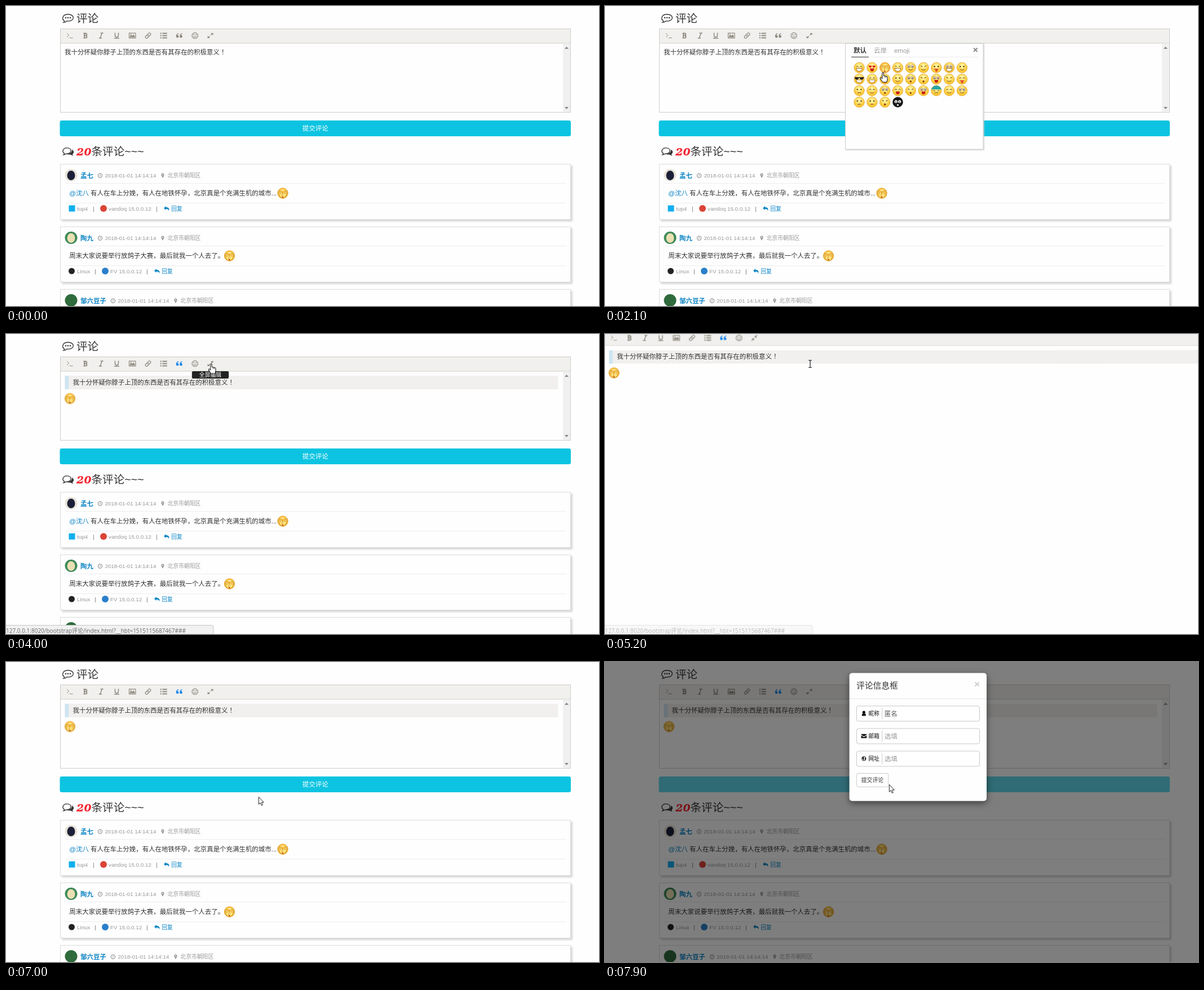
These frames come from a looping animation (1052x532 px, 8 s). An HTML page:

```html
<!DOCTYPE html>
<html lang="zh-CN">
<head>
<meta charset="utf-8">
<title>评论</title>
<style>
html, body { margin: 0; width: 100%; height: 100%; overflow: hidden; background: #fefefe; }
svg { display: block; font-family: "Liberation Sans", "Noto Sans CJK SC", "Noto Sans CJK", sans-serif; }
.icon { fill: none; stroke: currentColor; stroke-width: 1.2; }
.icon .f { fill: currentColor; stroke: none; }
.card { filter: drop-shadow(3px 3px 1.5px #d8d8d8); }
.pop { filter: drop-shadow(1px 1px 1px #ccc); }
.dialog { filter: drop-shadow(0 4px 6px rgba(0, 0, 0, .5)); }
.count { font: italic bold 23px "Noto Serif", serif; font-variant-numeric: oldstyle-nums; }
.mid { font-family: "Noto Sans CJK JP", sans-serif; }

/* 1.25% of the loop is one 100 ms tick */
.a { animation: 8s step-end -5ms infinite; }

#cursor { animation-name: move; }
@keyframes move {
  0%, 2.5% { transform: translate(898px, 102px); animation-timing-function: steps(2); }
  5% { transform: translate(567px, 108px); }
  7.5% { transform: translate(567px, 108px); animation-timing-function: steps(3); }
  11.25% { transform: translate(396px, 88px); }
  12.5% { transform: translate(396px, 88px); animation-timing-function: steps(4); }
  17.5% { transform: translate(335px, 53px); }
  21.25% { transform: translate(335px, 53px); animation-timing-function: steps(4); }
  26.25% { transform: translate(493px, 118px); animation-timing-function: steps(3); }
  30% { transform: translate(494px, 114px); }
  31.25% { transform: translate(494px, 114px); animation-timing-function: steps(4); }
  36.25% { transform: translate(334px, 84px); animation-timing-function: steps(4); }
  41.25% { transform: translate(307px, 54px); }
  43.75% { transform: translate(307px, 54px); animation-timing-function: steps(4); }
  48.75% { transform: translate(362px, 54px); }
  50% { transform: translate(364px, 53px); }
  66.25% { transform: translate(364px, 53px); animation-timing-function: steps(4); }
  71.25% { transform: translate(268px, 18px); }
  72.5% { transform: translate(265px, 12px); }
  80% { transform: translate(265px, 12px); animation-timing-function: steps(3); }
  83.75% { transform: translate(400px, 232px); }
  85% { transform: translate(413px, 250px); animation-timing-function: steps(2); }
  87.5% { transform: translate(448px, 239px); animation-timing-function: steps(2); }
  90%, 100% { transform: translate(504px, 217px); }
}
#beam { animation-name: beam; }
@keyframes beam {
  0%, 16.25%, 38.75%, 71.25%, 100% { visibility: hidden; }
  2.5%, 33.75%, 61.25% { visibility: visible; }
}
#hand { animation-name: hand; }
@keyframes hand {
  0%, 33.75%, 61.25%, 80%, 92.5%, 100% { visibility: hidden; }
  16.25%, 38.75%, 71.25%, 90% { visibility: visible; }
}
#arrow { animation-name: arrow; }
@keyframes arrow {
  0%, 90% { visibility: hidden; }
  80%, 92.5%, 100% { visibility: visible; }
}
#plain { animation-name: before-quote; }
#quote { animation-name: after-quote; }
#quoteIcon { animation-name: quote-icon; }
#inserted { animation-name: inserted; }
@keyframes before-quote { 0% { visibility: visible; } 42.5%, 100% { visibility: hidden; } }
@keyframes after-quote { 0% { visibility: hidden; } 42.5%, 100% { visibility: visible; } }
@keyframes quote-icon { 0% { color: #8e8a80; } 42.5%, 100% { color: #1a87ea; } }
@keyframes inserted {
  0% { visibility: hidden; transform: translateY(-4px); }
  31.25% { visibility: visible; transform: translateY(-4px); }
  42.5%, 100% { visibility: visible; transform: none; }
}
#caretLine { animation-name: caret-line; }
#caretQuote { animation-name: caret-quote; }
@keyframes caret-line { 0%, 17.5%, 100% { visibility: hidden; } 12.5% { visibility: visible; } }
@keyframes caret-quote { 0%, 61.25%, 100% { visibility: hidden; } 56.25% { visibility: visible; } }
#panel { animation-name: panel; }
@keyframes panel { 0%, 31.25%, 100% { visibility: hidden; } 21.25% { visibility: visible; } }
#tipFace { animation-name: tip-face; }
#tipQuote { animation-name: tip-quote; }
#tipFull { animation-name: tip-full; }
@keyframes tip-face { 0%, 21.25%, 100% { visibility: hidden; } 17.5% { visibility: visible; } }
@keyframes tip-quote { 0%, 43.75%, 100% { visibility: hidden; } 41.25% { visibility: visible; } }
@keyframes tip-full { 0%, 61.25%, 80%, 100% { visibility: hidden; } 46.25%, 73.75% { visibility: visible; } }
#status { animation-name: status; }
@keyframes status {
  0%, 67.5%, 80%, 100% { opacity: 0; }
  45%, 75% { opacity: 1; }
  61.25% { opacity: 1; animation-timing-function: steps(3); }
  65%, 72.5% { opacity: .45; }
  73.75% { opacity: .8; }
}
#edit { animation-name: edit; }
#cover, #shrink { animation-name: full-on; }
#grow { animation-name: full-off; }
@keyframes edit { 0%, 80%, 100% { transform: none; } 61.25% { transform: translate(-97.5px, -45.5px); } }
@keyframes full-on { 0%, 80%, 100% { visibility: hidden; } 61.25% { visibility: visible; } }
@keyframes full-off { 0%, 80%, 100% { visibility: visible; } 61.25% { visibility: hidden; } }
#submit { animation-name: submit; }
#ready { animation-name: ready; }
#busy { animation-name: busy; }
@keyframes submit { 0% { opacity: 1; } 92.5%, 100% { opacity: .65; } }
@keyframes ready { 0% { visibility: visible; } 92.5%, 100% { visibility: hidden; } }
@keyframes busy { 0% { visibility: hidden; } 92.5%, 100% { visibility: visible; } }
#shade { animation-name: shade; }
@keyframes shade {
  0% { opacity: 0; } 93.75% { opacity: .1; } 95% { opacity: .21; }
  96.25% { opacity: .4; } 97.5%, 100% { opacity: .5; }
}
#modal { animation-name: drop; }
#sheet { animation-name: sheet; }
#form { animation-name: form; }
@keyframes drop {
  0% { transform: translateY(-57px); }
  95% { transform: translateY(-33px); }
  96.25% { transform: translateY(-14px); }
  97.5% { transform: translateY(-3px); }
  98.75%, 100% { transform: none; }
}
@keyframes sheet { 0% { opacity: 0; } 95% { opacity: .85; } 96.25%, 100% { opacity: 1; } }
@keyframes form { 0% { opacity: 0; } 95% { opacity: .5; } 96.25% { opacity: .85; } 97.5%, 100% { opacity: 1; } }
</style>
</head>
<body>
<script>
const SMALL = 9.82, BODY = 11.46, HEAD = 19.6;
const GREY = '#8e8a80', BLUE = '#0a84c4', MUTED = '#999';

const text = (x, y, s, size = BODY, fill = '#333', more = '') =>
  `<text x="${x}" y="${y}" font-size="${size}" fill="${fill}" ${more}>${s}</text>`;
const rect = (x, y, w, h, fill, more = '') =>
  `<rect x="${x}" y="${y}" width="${w}" height="${h}" fill="${fill}" ${more}/>`;
const line = (x1, y1, x2, y2, color) => `<path d="M${x1} ${y1}L${x2} ${y2}" stroke="${color}"/>`;
const dot = (x, y, r, fill, more = '') => `<circle cx="${x}" cy="${y}" r="${r}" fill="${fill}" ${more}/>`;
const path = (d, more = '') => `<path d="${d}" ${more}/>`;
const solid = d => path(d, 'class="f"');
const anim = (id, body) => `<g id="${id}" class="a">${body}</g>`;
const at = (x, y, body) => `<g transform="translate(${x} ${y})">${body}</g>`;

const mark = 'M-5.9 1.6a2.4 2.4 0 1 0 4.8 0a2.3 2.3 0 0 0-2.6-2.3c.2-1.2 1-1.9 2.2-2.2v-1.3c-2.7.3-4.4 2.4-4.4 5.8z';
const icons = {
  code: path('M-5-4L-1.5-.7L-5 2.6M-.5 4H5.5', 'stroke-width="1"'),
  bold: path('M-3.5-4H.3a1.9 1.9 0 0 1 0 3.9H-2M.5 0a2 2 0 0 1 0 4.1H-3.5M-1.9-4V4', 'stroke-width="1.8"'),
  italic: path('M-1.2-4.4H4M-4 4.4H1.2M1.6-4.4L-1.6 4.4', 'stroke-width="1.5"'),
  under: path('M-3-5V-.3a3 3 0 0 0 6 0V-5M-4.5 4.8H4.5', 'stroke-width="1.5"'),
  image: path('M-5.7-4.4H5.7V4.4H-5.7Z') + solid('M-4.4 3V1L-2-1.2L0 .6L2-2.2L4.4 1V3Z') + dot(-2.8, -2, 1, '', 'class="f"'),
  link: `<g transform="rotate(-45)">${path('M1-2.2H-3.6a2.2 2.2 0 0 0 0 4.4H-1M-1 2.2H3.6a2.2 2.2 0 0 0 0-4.4H1M-2.4 0H2.4')}</g>`,
  list: path('M-6-4h2.2M-6 0h2.2M-6 4h2.2M-2.2-4H6M-2.2 0H6M-2.2 4H6', 'stroke-width="1.9"'),
  quote: solid(mark) + `<g transform="translate(6.4)">${solid(mark)}</g>`,
  smile: dot(0, 0, 5.2, 'none') + path('M-2.7 1.2Q0 4.4 2.7 1.2') + solid('M-2.7-2.4h1.6v1.8h-1.6zM1.1-2.4h1.6v1.8h-1.6z'),
  grow: path('M1 -1L4-4M-1 1L-4 4', 'stroke-width="1.6"') + solid('M5-4.6V-.8L1.2-4.6ZM-5 4.6V.8L-1.2 4.6Z'),
  shrink: path('M2-2L5-5M-2 2L-5 5', 'stroke-width="1.6"') + solid('M.6-.6V-4.4L4.4-.6ZM-.6 .6V4.4L-4.4 .6Z'),
  comment: path('M-6.3 5.1C-12 1.4-9.4-6.8 0-6.8C12.5-6.8 12.5 5.4 0 5.4L-2.2 5.2Q-4.8 7.6-7.8 7.6Q-6.2 6.6-6.3 5.1Z', 'stroke-width="1.4"') +
    [-4, 0, 4].map(x => dot(x, -.7, 1.3, '', 'class="f"')).join(''),
  comments: path('M-6.4 3.4C-11.4 .8-9-6.4-1.8-6.4C7.6-6.4 7.6 4 -1.8 4L-3.3 3.9Q-5.4 5.8-8 5.8Q-6.4 4.6-6.4 3.4Z', 'stroke-width="1.4"') +
    solid('M7-3.6C11-1.4 11 2.8 7.8 4.6Q8 6 9.6 7.2Q6.8 7.2 4.8 5.4Q.4 6-2.4 4.6C4.4 4.6 7.4 1 7-3.6Z'),
  clock: dot(0, 0, 3.6, 'none') + path('M.3-2V.6H-1.6', 'stroke-width=".9"'),
  pin: path('M0 4.4L-2.3 .2A2.7 2.7 0 1 1 2.3 .2ZM-1-1.4a1 1 0 1 0 2 0a1 1 0 1 0-2 0Z', 'class="f" fill-rule="evenodd"'),
  reply: solid('M-5-.8L-1.2-4.4V-2.2C3.4-2.2 5.2-.4 4 4C3.2 1.4 1.8 .6-1.2 .6V2.8Z'),
  user: solid('M-3.6 4.2C-3.8 1.2-2.6 .2-1.4 0A2.5 2.5 0 1 1 1.4 0C2.6 .2 3.8 1.2 3.6 4.2Z'),
  mail: solid('M-4.8-3.6H4.8V-2.6L0 .8L-4.8-2.6ZM-4.8-1.2L0 2.2L4.8-1.2V3.8H-4.8Z'),
  globe: dot(0, 0, 3.7, 'none', 'stroke-width="1"') + solid('M-3-2.4L.6-3L-.4-.6L.6 .6L-.8 2.6L-2.6-.2ZM1.4-1L3.4-1.2L3 1.6L1.8 2.4Z')
};
const icon = (name, x, y, color) =>
  `<g class="icon" color="${color}" transform="translate(${x} ${y})">${icons[name]}</g>`;

/* Faces: first letter eyes, second letter mouth */
const pair = f => f(-3.2) + f(3.2);
const eyes = {
  o: pair(x => dot(x, -2, 1.2, '#5a3208')),
  n: pair(x => path(`M${x - 2}-1.4q2-2.6 4 0`, 'stroke="#5a3208" fill="none"')),
  x: path('M-5-3.2L-1.6-1.8M5-3.2L1.6-1.8', 'stroke="#5a3208"'),
  w: pair(x => dot(x, -2.2, 2.5, '#fff', 'stroke="#7a4a10" stroke-width=".6"') + dot(x, -1.8, 1.1, '#40240a')),
  h: pair(x => path(`M${x} .6l-2.8-3q.4-2.4 2.8-.8q2.4-1.6 2.8 .8z`, 'fill="#e01c1c"')),
  s: path('M-8.4-3.4H8.4Q7.6 1 4.4 .8Q1.4 .6 .8-2H-.8Q-1.4 .6-4.4 .8Q-7.6 1-8.4-3.4Z', 'fill="#1c1c1c"'),
  m: path('M-9-2.2A9.3 9.3 0 0 1 9-2.2Z', 'fill="#2aa6a4"') + path('M-5 0h3M2 0h3', 'stroke="#5a3208"')
};
const mouths = {
  s: path('M-3.8 2.4Q0 6.2 3.8 2.4', 'stroke="#7a3c08" fill="none"'),
  g: path('M-5.4 1.2H5.4Q4.4 6.6 0 6.6T-5.4 1.2Z', 'fill="#fff" stroke="#8a4a10" stroke-width=".8"'),
  r: path('M-3.4 1.4H3.4Q3.4 6.6 0 6.6T-3.4 1.4Z', 'fill="#c91f14"'),
  t: path('M-4.4 2H4.4Q3.4 4 2 4V7H-1.6V4Q-3.6 4-4.4 2Z', 'fill="#e2472e"'),
  o: dot(0, 4, 1.7, '#8a3a0a'),
  f: path('M-3 4.2Q0 2.6 3 4', 'stroke="#7a3c08" fill="none"')
};
const hand = s => `<g transform="scale(${s} 1) rotate(24)" fill="#ffe07a" stroke="#cf8a1c" stroke-width=".8">
  ${path('M1.4 6.8Q-.4 2 .4-3.6Q1.4-6.6 2.8-5.6Q4.2-7.6 5.4-5.4Q7.2-5.4 7-2.6Q8 4 5.4 7Z')}
  ${path('M2.8-5.4V-.6M5-5.2V0', 'fill="none"')}</g>`;
const cover = dot(0, 0, 9.2, '#fdc544', 'stroke="#d8941c" stroke-width=".8"') +
  path('M-6-4.6Q0-8.6 6-4.6', 'fill="#fff0a0"') + hand(-1) + hand(1) + path('M-1.4 6.8h2.8', 'stroke="#b5380e" stroke-width="1.4"');
const face = k => k === 'cc' ? cover
  : k === 'kk' ? dot(0, 0, 9.3, '#161616') + pair(x => dot(x, -1, 2.6, '#fff') + dot(x, -.6, 1, '#161616')) + dot(0, 5, 1.6, '#fff')
  : dot(0, 0, 9.2, 'url(#skin)', 'stroke="#dc9c20" stroke-width=".7"') + eyes[k[0]] + mouths[k[1]];
const faces = ('ng hr cc xg ws xs ot wg os sg ng ot os wo xo wr xs nt ' +
  'of ns wo nr xo wr mf ns ws of of xo kk').split(' ');

const tools = ['code', 'bold', 'italic', 'under', 'image', 'link', 'list', 'quote', 'smile']
  .map((n, i) => n === 'quote'
    ? `<g id="quoteIcon" class="a">${icon(n, 307.6, 52.5, 'inherit')}</g>`
    : icon(n, 113.2 + 27.75 * i, 52.5, GREY)).join('');

const tip = (id, x, s) => {
  const w = s.length * SMALL + 26;
  return anim(id, rect(x - w / 2, 66, w, 13, '#222', 'rx="2"') + path(`M${x - 4} 66l4-4l4 4z`, 'fill="#222"') +
    text(x, 76.2, s, SMALL, '#fff', 'text-anchor="middle"'));
};

const cards = [
  { name: '孟七', skin: ['#e9e3d8', '#1b2038'], to: '@沈八', say: '有人在车上分娩，有人在地铁怀孕，北京真是个充满生机的城市...', face: 491,
    os: 'tup4', sign: rect(111.5, 353.5, 11, 11, '#11aeee'), web: 'vandoq 15.0.0.12', color: '#db4437', foot: [155, 173, 267] },
  { name: '陶九', skin: ['#3d8a58', '#ecdfb4'], to: '', say: '周末大家说要举行放鸽子大赛，最后就我一个人去了。', face: 396.5,
    os: 'Linux', sign: dot(116.5, 359, 5.5, '#222'), web: 'FV 15.0.0.12', color: '#2a7fc9', foot: [158, 176, 250] },
  { name: '邹六豆子', skin: ['#2f6b3c', '#2f6b3c'], to: '', say: '', face: 0 }
];
const card = (c, i) => {
  const dx = (c.name.length - 2) * BODY;
  let s = rect(96.5, 280.5, 905, 98, '#fefefe', 'stroke="#dcdcdc" class="card"') +
    dot(115.5, 300, 11, c.skin[0]) + `<ellipse cx="115.5" cy="300.5" rx="7" ry="8.5" fill="${c.skin[1]}"/>` +
    text(132, 304.7, c.name, BODY, BLUE, 'font-weight="bold"') +
    icon('clock', 167 + dx, 300.8, MUTED) + text(175.4 + dx, 304.4, '2018-01-01 14:14:14', SMALL, MUTED) +
    icon('pin', 278 + dx, 300.6, MUTED) + text(286.4 + dx, 304.4, '北京市朝阳区', SMALL, MUTED) +
    line(105, 314.5, 994, 314.5, '#ededed');
  if (c.say) {
    const [bar, web, end] = c.foot;
    s += text(112.3, 335.5, `<tspan fill="${BLUE}">${c.to}</tspan>${c.to && ' '}${c.say}`) + at(c.face, 332, cover) +
      line(105, 349.5, 994, 349.5, '#ededed') + c.sign + text(126, 363, c.os, SMALL, MUTED) +
      text(bar - 1, 363, '|', SMALL, '#666') + dot(web, 359, 6, c.color) + text(web + 9, 363, c.web, SMALL, MUTED) +
      text(end - 1, 363, '|', SMALL, '#666') + icon('reply', end + 18, 359.2, BLUE) + text(end + 26.3, 363, '回复', SMALL, BLUE);
  }
  return at(0, 111 * i, s);
};

const page =
  icon('comment', 110, 21.5, '#333') + text(125, 28.5, '评论', HEAD) +
  rect(96.5, 40.5, 905, 148, '#fefefe', 'stroke="#cfcdc8"') + rect(97, 41, 904, 25, '#f1f0ee') +
  line(96, 66, 1002, 66, '#cfcdc8') + rect(988, 66.5, 13, 121, '#f0f0f0') +
  path('M991 76l3.5-4l3.5 4zM991 179l3.5 4l3.5-4z', 'fill="#888"') +
  anim('submit', rect(95.5, 203, 906.5, 28, '#0cc4e1', 'rx="3.5"') +
    anim('ready', text(548.7, 221.3, '提交评论', BODY, '#fff', 'text-anchor="middle"')) +
    anim('busy', text(548.7, 221.3, '正在提交评论...', BODY, '#fff', 'text-anchor="middle"'))) +
  icon('comments', 110, 258, '#333') +
  '<text x="125" y="264.5" class="count" fill="#f5222d">20</text>' +
  text(151.5, 265, '条评论~~~', HEAD) + cards.map(card).join('');

const fullscreen = rect(0, 0, 1052, 532, '#fefefe') + rect(0, 0, 1052, 20, '#f1f0ee') +
  line(0, 20.5, 1052, 20.5, '#dddbd7') + rect(800, 28.5, 252, 24, '#f1f0ee');

const message = '我十分怀疑你脖子上顶的东西是否有其存在的积极意义<tspan class="mid" lang="ja">！</tspan>';
const editor = tools + anim('grow', icon('grow', 362.5, 52.5, GREY)) + anim('shrink', icon('shrink', 362.5, 52.5, GREY)) +
  anim('plain', text(104, 86.4, message)) +
  anim('quote', rect(104.5, 74, 875, 24, '#f1f0ee') + rect(104.5, 74, 6.7, 24, '#cfe6f1') + text(118.6, 89.7, message)) +
  anim('caretLine', rect(104, 100, 1, 14, '#222')) + anim('caretQuote', rect(348, 79, 1, 13, '#222')) +
  at(113.5, 114.5, anim('inserted', cover)) +
  tip('tipFace', 335.2, '表情') + tip('tipQuote', 307.6, '引用') + tip('tipFull', 362.5, '全屏编辑');

const panel = rect(426.5, 66.5, 244.5, 187.5, '#fefefe', 'stroke="#cfcfcf" class="pop"') +
  line(437, 90.5, 661, 90.5, '#ececec') + line(437, 90.5, 468, 90.5, '#333') +
  text(441, 83.3, '默认', BODY, '#333', 'font-weight="bold"') + text(477, 83.3, '云岸', BODY, MUTED) +
  text(513, 83, 'emoji', BODY, MUTED) + path('M654 74.5l6.6 6.6m0-6.6l-6.6 6.6', 'stroke="#888" stroke-width="2"') +
  faces.map((k, i) => at(451 + i % 9 * 22.8, 109.3 + Math.floor(i / 9) * 20.4, face(k))).join('');

const field = (y, name, label, hint, color) =>
  rect(446.5, y + .5, 218, 27, '#fff', 'rx="3" stroke="#c8c8c8"') + icon(name, 459.3, y + 13.8, '#111') +
  text(467.3, y + 17.5, label, SMALL, '#111') + line(491.5, y + 4, 491.5, y + 24, '#ccc') +
  text(495.7, y + 18.3, hint, BODY, color);
const sheet = rect(433.5, 19.5, 243.5, 227, '#fefefe', 'rx="5" class="dialog"');
const form = text(446, 46.5, '评论信息框', 14.73) + text(660, 45, '×', 17.2, '#ccc', 'font-weight="bold" text-anchor="middle"') +
  line(434, 65, 677, 65, '#e2e2e2') +
  field(77.5, 'user', '昵称', '匿名', '#555') + field(117.5, 'mail', '邮箱', '选填', MUTED) +
  field(157.5, 'globe', '网址', '选填', MUTED) +
  rect(446.5, 197.5, 56, 24, '#fff', 'rx="2.5" stroke="#ccc"') + text(454.8, 213.2, '提交评论', SMALL);

const status = path('M-1 516.5H365q3 0 3 3V533H-1Z', 'fill="#f1f1f1" stroke="#c6c6c6"') +
  text(0, 529.6, '127.0.0.1:8020/bootstrap评论/index.html?__hbt=1515115687467###', 10, '#666',
    `font-family="'Open Sans', 'Noto Sans CJK SC', sans-serif"`);

const cursor =
  anim('beam', path('M-3-6.5H-1L0-5.5L1-6.5H3M-3 6.5H-1L0 5.5L1 6.5H3M0-6V6', 'fill="none" stroke="#222" stroke-width="1.2"')) +
  anim('hand', path('M-1.2 8V.6Q0-1 1.3 .6V5.6L7 6.8Q8.2 7.2 8 9V12.4L6.8 17H-.4L-4.6 10.6Q-4.8 8.4-2.8 9.2L-1.2 10.6Z',
    'fill="#fff" stroke="#222" stroke-width="1.1"') + path('M3.4 6V9M5.6 6.6V9.2', 'stroke="#222" stroke-width=".8"')) +
  anim('arrow', path('M.3 .3V13.4L3.2 10.7L5.3 15.4L7.3 14.5L5.3 9.9H9.3Z', 'fill="#fff" stroke="#222"'));

document.body.innerHTML = `<svg width="1052" height="532" viewBox="0 0 1052 532">
  <defs><radialGradient id="skin" cy=".35"><stop offset=".2" stop-color="#fff5a0"/><stop offset="1" stop-color="#fbc834"/></radialGradient></defs>
  ${page}${anim('cover', fullscreen)}${anim('edit', editor)}${anim('panel', panel)}${anim('status', status)}
  ${anim('shade', rect(0, 0, 1052, 532, '#000'))}
  ${anim('modal', anim('sheet', sheet) + anim('form', form))}${anim('cursor', cursor)}
</svg>`;
</script>
</body>
</html>
```
